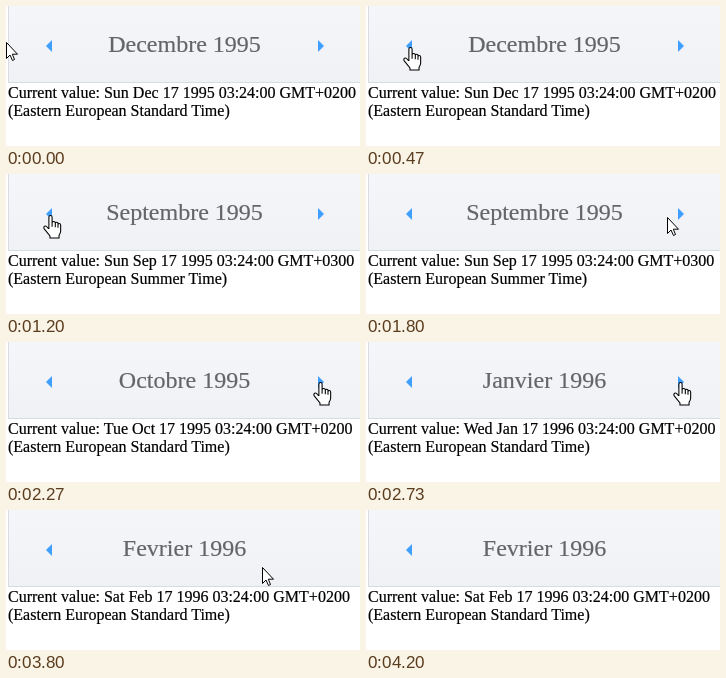
Animation of 354 by 140 pixels, one loop 4.59 s. Source, as an HTML page:

```html
<!DOCTYPE html>
<html lang="en">
<head>
<meta charset="utf-8">
<title>Month picker</title>
<style>
  html, body { margin: 0; width: 100%; height: 100%; overflow: hidden; background: #fff; }
  svg { display: block; font: 16px "Liberation Serif", "Times New Roman", serif; }
  text { stroke: #000; stroke-width: .2px; }
  #title { font-size: 24px; fill: #646569; stroke: #646569; text-anchor: middle; }
  .nav { fill: #409eff; }
  #cursor path { fill: #fff; stroke: #000; }
</style>
</head>
<body>
<svg width="354" height="140" viewBox="0 0 354 140">
  <defs>
    <linearGradient id="bar" x2="0" y2="1">
      <stop stop-color="#f5f6f9"/>
      <stop offset="1" stop-color="#eff1f5"/>
    </linearGradient>
  </defs>
  <rect x="2" width="352" height="77" fill="#d8dbe2"/>
  <rect x="3" width="351" height="76" fill="url(#bar)"/>
  <path class="nav" d="M40 40L46 34V46Z"/>
  <path class="nav" id="next" d="M318 40L312 34V46Z"/>
  <text id="title" x="178.5" y="46"></text>
  <text id="value" x="2" y="92"></text>
  <text id="zone" x="2" y="110"></text>
  <g id="cursor">
    <path id="arrow" d="M.5 .5V16.5L4 13L6.5 18.5L8.5 17.5L6.3 12.2H11.5Z"/>
    <path id="hand" transform="translate(-6 0) scale(1.07)" d="M5.5 13V2Q5.5 .5 7 .5T8.5 2V7.5Q8.5 6 10 6T11.5 7.5V8Q11.5 6.8 12.8 6.8T14 8.3V9Q14 8 15.2 8T16.5 9.5V15Q16.5 17 15 19V21.5H6.5V19.5L1 12.8Q.2 11.2 1.5 10.5T4 11.5L5.5 13M8.5 7.5V11M11.5 8V11.5M14 9V12"/>
  </g>
</svg>
<script>
const LOOP = 4590, FPS = 15;
const $ = id => document.getElementById(id);
const show = (id, on) => $(id).setAttribute('visibility', on ? 'visible' : 'hidden');

// title, date, hour offset
const months = [
  ['Septembre 1995', 'Sun Sep 17 1995', 3],
  ['Octobre 1995', 'Tue Oct 17 1995', 2],
  ['Novembre 1995', 'Fri Nov 17 1995', 2],
  ['Decembre 1995', 'Sun Dec 17 1995', 2],
  ['Janvier 1996', 'Wed Jan 17 1996', 2],
  ['Fevrier 1996', 'Sat Feb 17 1996', 2]
];
// [tick, month index]
const clicks = [[0, 3], [12, 2], [15, 1], [18, 0], [31, 1], [35, 2], [38, 3], [41, 4], [47, 5]];
// [start tick, end tick, from, control, to]
const moves = [
  [0, 7, [0, 36], [22, 56], [43, 41]],
  [20, 28, [43, 41], [178, 72], [313, 40]],
  [54, 62, [313, 40], [230, 60], [103, 128]]
];

function pointer(tick) {
  const [start, end, a, b, c] = moves.filter(m => m[0] <= tick).pop();
  const u = Math.min(1, (tick - start) / (end - start));
  const p = u * u * (3 - 2 * u), q = 1 - p;
  return a.map((v, i) => Math.round(q * q * v + 2 * p * q * b[i] + p * p * c[i]));
}

function draw(time) {
  const tick = Math.floor((time % LOOP + 5) * FPS / 1000);
  const index = clicks.filter(c => c[0] <= tick).pop()[1];
  const [title, date, offset] = months[index];
  $('title').textContent = title;
  $('value').textContent = `Current value: ${date} 03:24:00 GMT+0${offset}00`;
  $('zone').textContent = `(Eastern European ${offset > 2 ? 'Summer' : 'Standard'} Time)`;
  show('next', index < 5);

  const [x, y] = pointer(tick);
  const inside = tick < 63;
  const over = tick < 48 && (Math.abs(x - 43) < 8 || Math.abs(x - 313) < 8);
  $('cursor').setAttribute('transform', `translate(${x} ${y})`);
  show('hand', inside && over);
  show('arrow', inside && !over);
}

const origin = performance.now();
function loop() {
  draw(performance.now() - origin);
  requestAnimationFrame(loop);
}
loop();
</script>
</body>
</html>
```
